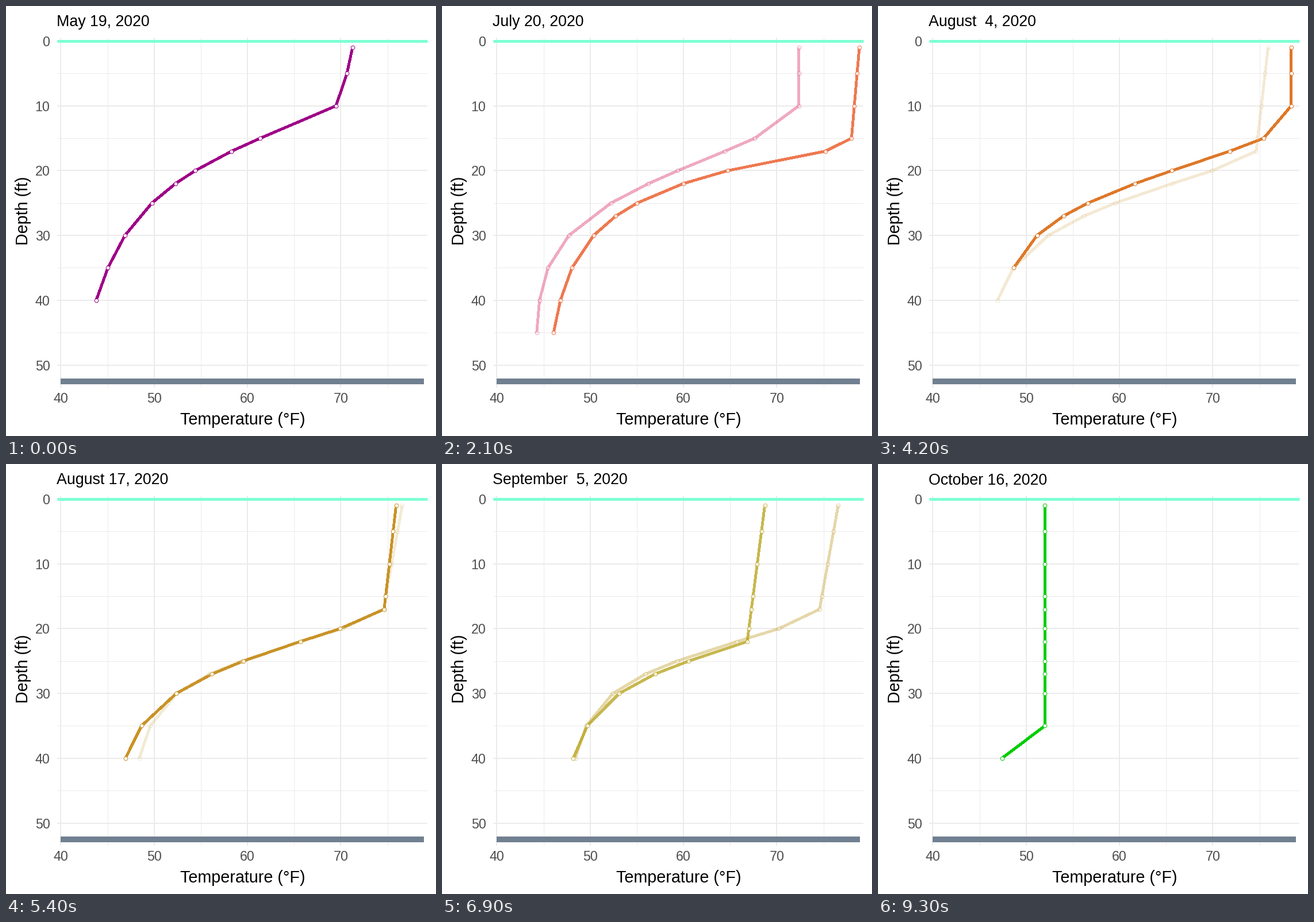
Recreate the animation shown at these times as a matplotlib script. Size 748x748 px, loop 10000 ms.

```python
import matplotlib.pyplot as plt
import numpy as np
from matplotlib.animation import FuncAnimation
from matplotlib.patches import Rectangle

SIZE, DPI = 748, 100
PX = 72 / DPI  # points per pixel
FRAMES, INTERVAL = 100, 100
LEFT, RIGHT, TOP, BOTTOM = 89, 733, 54.5, 664
GRID, GREY = "#ebebeb", "#4d4d4d"

plt.rcParams["font.family"] = "Liberation Sans"

# title, colour, deepest reading, then the water column:
# surface temperature, cooling per foot, knee depth, total drop, scale, shape
PROFILES = [
    ("May 19, 2020", "#9e0087", 40, (71.4, 0.15, 9.5, 22, 10.4, 1.3)),
    ("June 24, 2020", "#d82868", 45, (72.35, 0, 10, 28.2, 13.2, 1.75)),
    ("July 20, 2020", "#ea5826", 45, (78.9, 0.06, 16.4, 30.5, 6.5, 1)),
    ("August  4, 2020", "#de782a", 35, (78.4, 0, 12, 31, 11.6, 1.7)),
    ("August 17, 2020", "#ca9228", 40, (76, 0.08, 17, 26.5, 9.4, 1.48)),
    ("August 26, 2020", "#c09b2a", 40, (76.7, 0.125, 17, 23.4, 8.3, 1.65)),
    ("September  5, 2020", "#baa724", 40, (68.8, 0.09, 22, 17.5, 6.2, 1.2)),
    ("October  4, 2020", "#68bc00", 45, (56.55, 0.034, 29.85, 8.1, 4, 1)),
    ("October 16, 2020", "#00cd00", 40, (52, 0, 35, 5, 2, 1)),
]


def px(temp):
    return 95.5 + (temp - 40) * 16.233


def py(depth):
    return 61 + depth * 11.27


def temperature(depth, surface, cooling, knee, drop, scale, shape):
    """A mixed upper layer over a thermocline that decays with depth."""
    below = np.maximum(depth - knee, 0) / scale
    return surface - cooling * depth - drop * (1 - np.exp(-below ** shape))


def reading_depths(index, deepest):
    extra = {1, 17, 22} | ({27} if index >= 2 else set())
    depths = sorted(extra | set(range(5, 50, 5)))
    return np.array([d for d in depths if d <= deepest])


fig = plt.figure(figsize=(SIZE / DPI, SIZE / DPI), dpi=DPI, facecolor="white")
ax = fig.add_axes([0, 0, 1, 1])
ax.set_xlim(0, SIZE)
ax.set_ylim(SIZE, 0)
ax.axis("off")


def rule(xs, ys, width, color, z=1):
    ax.plot(xs, ys, color=color, lw=width * PX, zorder=z,
            solid_capstyle="butt")


def label(x, y, text, size, color="black", **kw):
    return ax.text(x, y, text, fontsize=size * PX, color=color,
                   va="baseline", **kw)


def draw_panel():
    for temp in range(40, 80, 5):
        rule([px(temp)] * 2, [TOP, BOTTOM], 1 if temp % 10 else 2, GRID)
    for depth in range(0, 55, 5):
        rule([LEFT, RIGHT], [py(depth)] * 2, 1 if depth % 10 else 2, GRID)
    rule([LEFT, RIGHT], [py(0)] * 2, 5, "#7fffd4", 2)
    ax.add_patch(Rectangle((px(40), 648), px(78.9) - px(40), 10,
                           facecolor="#708090", edgecolor="none", zorder=2))

    for temp in range(40, 80, 10):
        label(px(temp), 690, str(temp), 23.3, GREY, ha="center")
    for depth in range(0, 60, 10):
        label(76.5, py(depth) + 9, str(depth), 23.3, GREY, ha="right")
    label(411.5, 728, "Temperature (°F)", 28.8, ha="center")
    label(37.7, 356, "Depth (ft)", 28.8, ha="center", rotation=90,
          rotation_mode="anchor")


def make_profile(index, color, deepest, column):
    depths = reading_depths(index, deepest)
    xs, ys = px(temperature(depths, *column)), py(depths)
    line, = ax.plot(xs, ys, color=color, lw=3.8 * PX, zorder=3,
                    solid_capstyle="butt", antialiased=False)
    dots, = ax.plot(xs, ys, ls="none", marker="o", ms=6.6 * PX, mfc="white",
                    mec=color, mew=PX, zorder=4)
    return line, dots


def fade_timing(index):
    """First frame and number of steps of the change to the next profile."""
    return min(6 + 12 * index, 89), 5 if index < 6 else 4


def state_at(frame):
    """Return the index for the title and the opacity of each profile."""
    alphas = [1.0] + [0.0] * (len(PROFILES) - 1)
    shown = 0
    for i in range(len(PROFILES) - 1):
        start, steps = fade_timing(i)
        k = frame - start + 1
        if k < 1:
            break
        alphas[i] = max(0.0, 1 - (k - 1) / steps)
        alphas[i + 1] = min(1.0, k / steps)
        if 2 * k > steps:
            shown = i + 1
    return shown, alphas


draw_panel()
title = label(88.5, 35, "", 26.8, ha="left")
profiles = [make_profile(i, *p[1:]) for i, p in enumerate(PROFILES)]


def update(frame):
    shown, alphas = state_at(frame)
    title.set_text(PROFILES[shown][0])
    for artists, alpha in zip(profiles, alphas):
        for artist in artists:
            artist.set_visible(alpha > 0)
            artist.set_alpha(alpha)
    return [title] + [a for pair in profiles for a in pair]


anim = FuncAnimation(fig, update, frames=FRAMES, interval=INTERVAL,
                     repeat=True, repeat_delay=0, blit=False)
plt.show()
```
